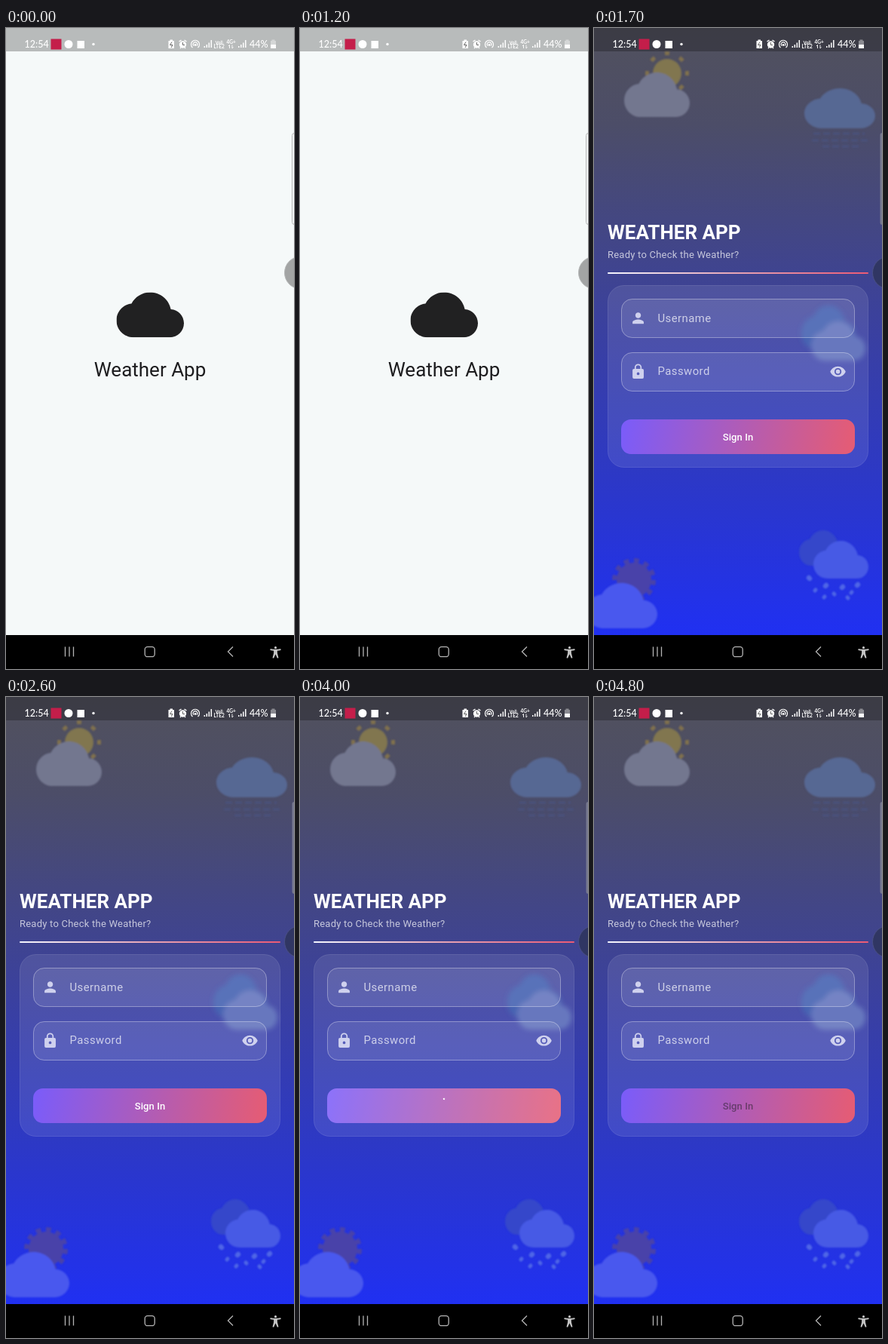
These frames come from a looping animation (382x850 px, 5 s). An HTML page:

```html
<!DOCTYPE html>
<html lang="en">
<head>
<meta charset="utf-8">
<title>Weather App</title>
<style>
html, body { margin: 0; width: 100%; height: 100%; overflow: hidden; background: #000; }
svg.stage { display: block; width: 100%; height: 100%; }
text { font-family: Roboto, sans-serif; fill: #fff; }
.status text { font-family: Lato, sans-serif; font-weight: 500; }
.field text { font-size: 14.86px; letter-spacing: .46px; fill: #fff; fill-opacity: .7; }
.field rect { fill: #fff; fill-opacity: .09; stroke: #fff; stroke-opacity: .36; }

.splash, .clouds, .label, .ripple, .spinner {
  animation: 5s step-end infinite;
}
.splash { animation-name: splash; }
.clouds { animation-name: clouds; }
.label { animation-name: label; }
.ripple { animation-name: ripple; }
.spinner { animation-name: spinner; transform-origin: 191px 542px; }

@keyframes splash { 0% { visibility: visible } 30%, 100% { visibility: hidden } }
@keyframes clouds { 0% { visibility: hidden } 32%, 100% { visibility: visible } }
@keyframes label {
  0% { fill: #fff; fill-opacity: 1 }
  80% { fill: #fff; fill-opacity: 0 }
  96%, 100% { fill: #1d1b20; fill-opacity: .5 }
}
@keyframes ripple {
  0% { opacity: 0 }
  78% { opacity: .06 }
  80% { opacity: .14 }
  82% { opacity: .1 }
  84% { opacity: .06 }
  86% { opacity: .03 }
  92%, 100% { opacity: 0 }
}
/* The arc grows from the top while the whole ring turns; lengths are in degrees. */
@keyframes spinner {
  0% { visibility: hidden }
  80% { visibility: visible; transform: rotate(-97deg); stroke-dasharray: 14 360 }
  82% { visibility: visible; transform: rotate(-67deg); stroke-dasharray: 17.4 360 }
  84% { visibility: visible; transform: rotate(-44deg); stroke-dasharray: 99 360 }
  86% { visibility: visible; transform: rotate(-21deg); stroke-dasharray: 190 360 }
  92% { visibility: visible; transform: rotate(48deg); stroke-dasharray: 267 360 }
  96%, 100% { visibility: hidden }
}
</style>
</head>
<body>
<svg class="stage" viewBox="0 0 382 850" preserveAspectRatio="none">
  <defs>
    <linearGradient id="sky" x2="0" y2="1">
      <stop stop-color="#51515d"/><stop offset=".16" stop-color="#4c4d68"/>
      <stop offset=".5" stop-color="#3a40a0"/><stop offset=".8" stop-color="#2936d0"/>
      <stop offset="1" stop-color="#2030f2"/>
    </linearGradient>
    <linearGradient id="rule">
      <stop stop-color="#f4f6ff"/><stop offset=".5" stop-color="#e6a3b4"/><stop offset="1" stop-color="#ec5a74"/>
    </linearGradient>
    <linearGradient id="action" gradientUnits="userSpaceOnUse" x1="36" y1="519" x2="346" y2="565">
      <stop stop-color="#7a5cfa"/><stop offset="1" stop-color="#e65c73"/>
    </linearGradient>
    <filter id="soft" x="-20%" y="-20%" width="140%" height="140%"><feGaussianBlur stdDeviation=".8"/></filter>
    <filter id="frost" x="-20%" y="-20%" width="140%" height="140%"><feGaussianBlur stdDeviation="3"/></filter>
    <symbol id="cloud" viewBox="0 4 24 16" preserveAspectRatio="none">
      <path d="M19.35 10.04C18.67 6.59 15.64 4 12 4 9.11 4 6.6 5.64 5.35 8.04 2.34 8.36 0 10.91 0 14c0 3.31 2.69 6 6 6h13c2.76 0 5-2.24 5-5 0-2.64-2.05-4.78-4.65-4.96z"/>
    </symbol>
    <g id="signal"><path d="M.8 10V8M3.8 10V6M6.8 10V3.5M9.8 10V0" stroke="#fff" stroke-width="1.5"/></g>
  </defs>

  <rect width="382" height="806" fill="url(#sky)"/>

  <g class="clouds">
    <g filter="url(#soft)">
      <circle cx="97" cy="60" r="19" fill="#81764f"/>
      <circle cx="97" cy="60" r="26.5" fill="none" stroke="#80714e" stroke-width="5" pathLength="80" stroke-dasharray="3 7" stroke-dashoffset="1.5"/>
      <use href="#cloud" x="40" y="59" width="87" height="59" fill="#73778f"/>

      <use href="#cloud" x="279" y="80" width="94" height="53" fill="#566893"/>
      <path d="M291 140h68M289 149h74M303 157h52" stroke="#4b5784" stroke-width="3" stroke-dasharray="9 4" opacity=".65"/>

      <use href="#cloud" x="272" y="666" width="64" height="47" fill="#3447ca"/>
      <use href="#cloud" x="291" y="680" width="73" height="50" fill="#475ae5"/>
      <g fill="none" stroke="#5066e6" stroke-width="6.5" stroke-linecap="round">
        <path d="M285 729l1 1M307 740l1-1M329 742l1-1M349 739l1-1"/>
        <path d="M293 746l1-1M318 750l1 1M341 749l1-1M305 755l1-1M336 755l1 1" stroke-width="5"/>
      </g>

      <circle cx="53" cy="732" r="23" fill="#4943a9"/>
      <circle cx="53" cy="732" r="25" fill="none" stroke="#4943a9" stroke-width="8" pathLength="120" stroke-dasharray="5 5"/>
      <use href="#cloud" x="-11" y="736" width="95" height="60" fill="#4a59ee"/>
    </g>
    <g filter="url(#frost)">
      <use href="#cloud" x="275" y="368" width="72" height="58" fill="#3454aa"/>
      <use href="#cloud" x="288" y="389" width="72" height="52" fill="#586ab8"/>
    </g>
  </g>

  <text x="18" y="280" font-size="26" font-weight="700">WEATHER APP</text>
  <text x="18" y="305" font-size="13" letter-spacing=".23" fill-opacity=".7">Ready to Check the Weather?</text>
  <rect x="18" y="324" width="346" height="2" rx="1" fill="url(#rule)"/>
  <rect x="18.5" y="341.5" width="345" height="241" rx="21" fill="#fff" fill-opacity=".09" stroke="#fff" stroke-opacity=".13"/>

  <g class="field">
    <rect x="36.5" y="359.5" width="309" height="51" rx="14"/>
    <text x="84.5" y="389.5">Username</text>
    <rect x="36.5" y="430.5" width="309" height="51" rx="14"/>
    <text x="84.5" y="460">Password</text>
  </g>
  <g fill="#cfd1ee">
    <path transform="translate(47.4 373.6) scale(.929)" d="M12 12c2.21 0 4-1.79 4-4s-1.79-4-4-4-4 1.79-4 4 1.79 4 4 4zm0 2c-2.67 0-8 1.34-8 4v2h16v-2c0-2.66-5.33-4-8-4z"/>
    <path transform="translate(47.4 444.5) scale(.929)" d="M18 8h-1V6a5 5 0 0 0-10 0v2H6a2 2 0 0 0-2 2v10a2 2 0 0 0 2 2h12a2 2 0 0 0 2-2V10a2 2 0 0 0-2-2zm-6 9a2 2 0 1 1 0-4 2 2 0 0 1 0 4zm3.1-9H8.9V6a3.1 3.1 0 0 1 6.2 0z"/>
    <path transform="translate(312.4 444.5) scale(.929)" d="M12 4.5C7 4.5 2.73 7.61 1 12c1.73 4.39 6 7.5 11 7.5s9.27-3.11 11-7.5c-1.73-4.39-6-7.5-11-7.5zM12 17a5 5 0 1 1 0-10 5 5 0 0 1 0 10zm0-8a3 3 0 1 0 0 6 3 3 0 0 0 0-6z"/>
  </g>

  <rect x="36" y="519" width="310" height="46" rx="13" fill="url(#action)"/>
  <rect class="ripple" x="36" y="519" width="310" height="46" rx="13" fill="#fff"/>
  <text class="label" x="191" y="546.7" font-size="13" font-weight="500" letter-spacing=".1" text-anchor="middle">Sign In</text>
  <circle class="spinner" cx="191" cy="542" r="9" fill="none" stroke="#fff" stroke-width="2" pathLength="360"/>

  <rect x="379.5" y="139" width="6" height="122" rx="3" fill="#777990"/>
  <circle cx="391" cy="324.5" r="21.5" fill="#303663" stroke="#4a5085"/>

  <g class="splash">
    <rect width="382" height="806" fill="#f5f9f9"/>
    <use href="#cloud" x="146.5" y="350.5" width="89.5" height="59.7" fill="#212122"/>
    <text x="191" y="462" font-size="26" text-anchor="middle" style="fill:#1d1d1f">Weather App</text>
    <rect x="379.5" y="139.5" width="6" height="121" rx="3" fill="#f5f7f7" stroke="#b4b6b6"/>
    <circle cx="391" cy="324.5" r="21.5" fill="#a2a4a4" stroke="#b5b7b7"/>
  </g>

  <rect width="382" height="31" fill="#000" fill-opacity=".25"/>
  <g class="status" fill="#fff">
    <text x="24.5" y="25.5" font-size="12.5">12:54</text>
    <rect x="59.5" y="14.5" width="14" height="14" fill="#c41e4a"/>
    <circle cx="83" cy="21.5" r="5.5"/>
    <rect x="94.5" y="17" width="9.5" height="10"/>
    <circle cx="116" cy="21.5" r="1.7"/>

    <path d="M217.5 15.5h3.5v1.5h2v10h-7.500v-10h2z"/>
    <path d="M220 18.5l-2.500 4h3.500l-2 3.500" fill="none" stroke="#666" stroke-width="1"/>
    <circle cx="234.500" cy="22" r="4.700"/>
    <path d="M229.500 18l3-2M239.500 18l-3-2M231 27l1-1M238 27l-1-1" stroke="#fff" stroke-width="1.500"/>
    <path d="M234.500 19v3.500h2.500" fill="none" stroke="#666"/>
    <g fill="none" stroke="#fff" stroke-width="1.200">
      <path d="M247.500 26a5.500 5.500 0 1 1 7 0M249 23.500a2.800 2.800 0 1 1 4 0"/>
    </g>
    <circle cx="251" cy="22.500" r="1.400"/>
    <use href="#signal" x="262.500" y="16"/>
    <text x="277.500" y="20.500" font-size="6" style="font-weight:700">Vo))</text>
    <text x="275.500" y="27" font-size="6.500" style="font-weight:700">LTE2</text>
    <text x="292.500" y="20.500" font-size="6.500" style="font-weight:700">4G+</text>
    <path d="M296.500 27v-4.500l-1.500 1.500M300 22.500v4.500l1.500-1.500" fill="none" stroke="#fff" stroke-width=".9"/>
    <use href="#signal" x="308" y="16"/>
    <text x="323" y="25.500" font-size="12.500">44%</text>
    <path d="M352.500 15.500h4v1.500h1.500v10h-7v-10h1.500z" fill-opacity=".4"/>
    <path d="M351 22h7v5h-7z"/>
  </g>

  <rect y="805" width="382" height="45"/>
  <g fill="none" stroke="#b4b4b4" stroke-width="1.300">
    <path d="M78.500 820.500v13M84 820.500v13M89.500 820.500v13"/>
    <rect x="184.200" y="820.700" width="13" height="13" rx="3.500"/>
    <path d="M301 820.500l-6.500 6.500 6.500 6.500"/>
  </g>
  <path transform="translate(347.900 818.500) scale(.8)" fill="#c4c4c4" d="M20.500 6c-2.610.7-5.670 1-8.500 1s-5.890-.3-8.500-1L3 8c1.860.5 4 .83 6 1v4l-2 8 2 .7 3-6.700 3 6.700 2-.7-2-8V9c2-.17 4.140-.5 6-1zM12 6a2 2 0 1 0 0-4 2 2 0 0 0 0 4z"/>
</svg>
</body>
</html>
```
